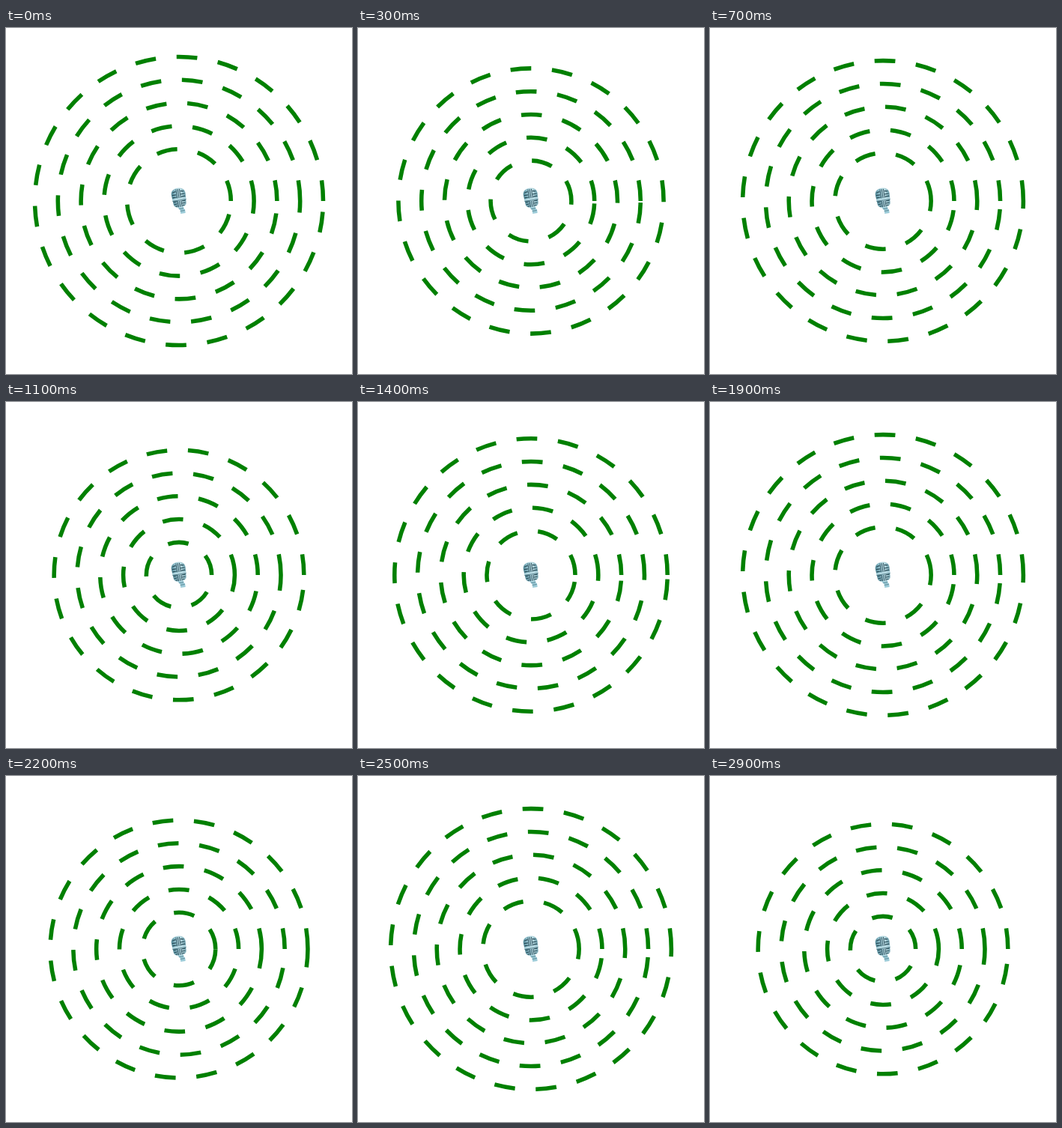
Write an HTML page that moves like this. It is 462 px wide and 462 px high and loops after 3 s.

```html
<!DOCTYPE html>
<html lang="en">
<head>
<meta charset="utf-8">
<title>Sound waves</title>
<style>
  html, body { margin: 0; width: 100%; height: 100%; overflow: hidden; background: #fff; }
  svg { display: block; width: 462px; height: 462px; }
  .waves circle {
    fill: none;
    stroke: #008000;
    stroke-width: 5.556px;
    stroke-dasharray: 27.778px 27.778px;
    r: var(--r);
    animation: shrink 600ms steps(6, end) infinite;
  }
  @keyframes shrink {
    from { r: var(--r); }
    to { r: calc(var(--r) - 30.8px); }
  }
</style>
</head>
<body>
<svg viewBox="0 0 462 462">
  <defs>
    <linearGradient id="metal">
      <stop offset="0" stop-color="#4f8796"/>
      <stop offset=".35" stop-color="#9fcbd7"/>
      <stop offset=".65" stop-color="#c4e3ea"/>
      <stop offset="1" stop-color="#6a9eac"/>
    </linearGradient>
  </defs>

  <!-- dashes run anticlockwise from the right -->
  <g class="waves" transform="translate(231 231) scale(1 -1)">
    <circle style="--r: 192.5px"/>
    <circle style="--r: 161.7px"/>
    <circle style="--r: 130.9px"/>
    <circle style="--r: 100.1px"/>
    <circle style="--r: 69.3px"/>
  </g>

  <g transform="translate(231 227) rotate(-9)">
    <path d="M-3 11H4V15L5.5 16V21H-1V16L-3 14Z" fill="#9ccbd8"/>
    <path d="M-2 14.5H4M-1 17.5H5" stroke="#527f8c" stroke-width=".8"/>
    <path d="M-9.5-5C-9.5-11-5-13.5 0-13.5S9.5-11 9.5-5L8.5 8C8 11 5 13 0 13S-8 11-8.5 8Z" fill="url(#metal)"/>
    <g fill="none" stroke="#294d59" stroke-width="1.2">
      <path d="M-7.5-8Q-5-9-3-9M-8.5-4.7H-3M-8.5-1.5H-3M-8 4.5H-3M-7.5 7.5H-3M-6 10.3H-3"/>
      <path d="M3-9Q5-9 7.5-8M3-4.7H8.5M3-1.5H8.5M3 4.5H8M3 7.5H7.5M3 10.3H6"/>
      <path d="M-2.3-12V0M2.3-12V0M0-12V0M-2.3 4V12M2.3 4V12M0 4V12" stroke-width=".9"/>
    </g>
    <path d="M-9.3 1.5H9.3" stroke="#b9dce5" stroke-width="2.2"/>
    <path d="M-9.2 3H9.2" stroke="#3d6673" stroke-width=".7"/>
  </g>
</svg>
</body>
</html>
```
